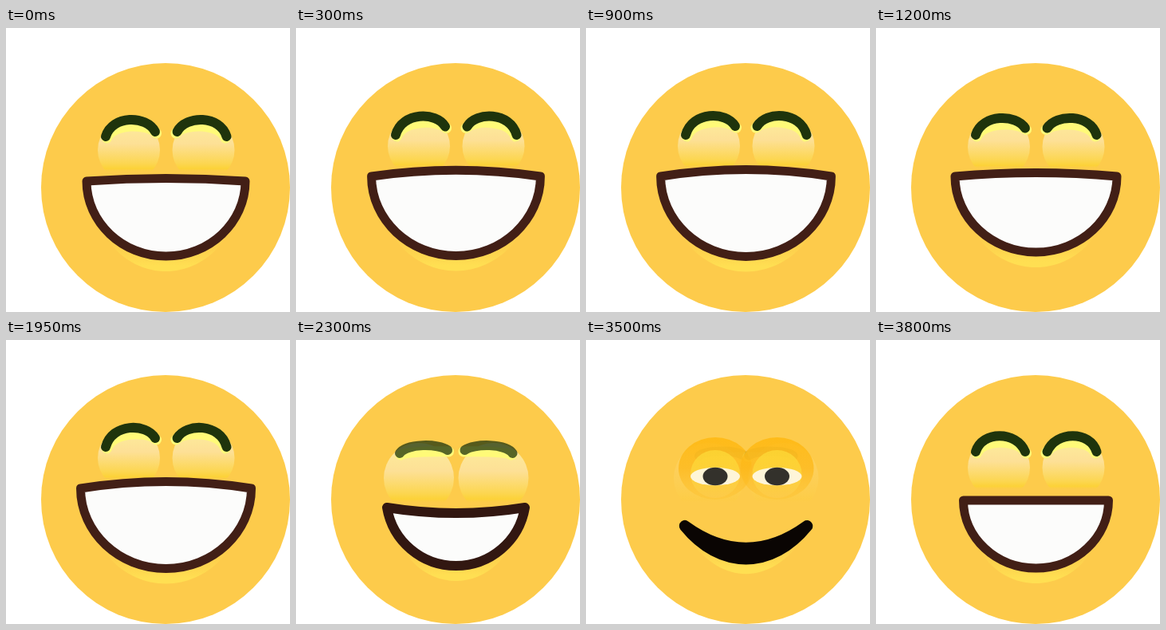
These frames come from a looping animation (356x356 px, 3850 ms). An HTML page with a canvas:

```html
<!DOCTYPE html>
<html lang="en">
<head>
<meta charset="utf-8">
<title>Laughing face</title>
<style>
  html, body { margin: 0; width: 100%; height: 100%; overflow: hidden; background: #fff; }
  canvas { display: block; }
</style>
</head>
<body>
<canvas id="stage" width="356" height="356"></canvas>
<script>
const ctx = document.getElementById('stage').getContext('2d');
const LOOP = 3850, STEP = 50, MID = 200.5;
const FACE = '#fdcb4b', CLEAR = 'rgba(253,203,75,0)';

// half width, corner y, top y, bottom y, inset, stroke | brow outer y, inner y, control y | cheek y, radius | brow alpha, eye
const opening = [91, 201, 201, 286, 0, 11, 140, 140, 113.5, 160, 39, 1, 0];
const rising = [99.5, 192, 188.5, 286, 0, 11, 136, 130, 109, 153, 39, 1, 0];
const wide = [107, 186, 177.5, 286.5, 0, 11, 134, 123, 104, 148, 39, 1, 0];
const shake = [101.5, 186, 181.5, 281, 0, 11, 134, 125.5, 107.5, 149, 39, 1, 0];
const half = [86.5, 210, 217, 283, .25, 12, 142, 138, 129.5, 173, 44, .75, 0];
const calm = [72, 240, 272, 272, 1, 15, 146, 146, 140, 173, 44, 0, 1];
const smile = [74, 239, 272, 272, 1, 15, 146, 146, 140, 173, 44, 0, 1];

const linear = u => u;
const smooth = u => u * u * (3 - 2 * u);
// time, pose, easing towards the next key
const keys = [
  [0, rising, linear], [200, wide, smooth], [550, shake, smooth], [875, wide, smooth],
  [1200, shake, smooth], [1300, wide, linear], [1550, wide, smooth], [1750, shake, smooth],
  [1950, wide, linear], [2000, wide, linear], [2300, half, linear], [2650, calm, linear],
  [2850, calm, smooth], [3050, smile, linear], [3450, smile, linear], [3700, half, linear],
  [3800, opening, linear], [LOOP, rising, linear]
];

const lerp = (a, b, u) => a + (b - a) * u;

function poseAt(t) {
  const i = keys.findIndex(k => k[0] > t);
  const [t0, from, ease] = keys[i - 1], [t1, to] = keys[i];
  const u = ease((t - t0) / (t1 - t0));
  return from.map((v, n) => lerp(v, to[n], u));
}

function vertical(y0, y1, ...stops) {
  const g = ctx.createLinearGradient(0, y0, 0, y1);
  stops.forEach(([at, color]) => g.addColorStop(at, color));
  return g;
}

function ellipse(x, y, rx, ry, fill) {
  ctx.beginPath();
  ctx.ellipse(x, y, rx, ry, 0, 0, Math.PI * 2);
  ctx.fillStyle = fill;
  ctx.fill();
}

function mouthPath(w, y, top, bottom, inset) {
  const h = bottom - y, dx = w - inset * w / 3;
  const cy = y + (.55 + .117 * inset) * h, bx = (.55 - .217 * inset) * w;
  ctx.beginPath();
  ctx.moveTo(MID - w, y);
  ctx.quadraticCurveTo(MID, 2 * top - y, MID + w, y);
  ctx.bezierCurveTo(MID + dx, cy, MID + bx, bottom, MID, bottom);
  ctx.bezierCurveTo(MID - bx, bottom, MID - dx, cy, MID - w, y);
  ctx.closePath();
}

function browStroke(x0, y0, x1, y1, cy, width, color) {
  ctx.beginPath();
  ctx.moveTo(x0, y0);
  ctx.bezierCurveTo(x0 + 8, cy, x1 - 11, cy, x1, y1);
  ctx.lineWidth = width;
  ctx.strokeStyle = color;
  ctx.stroke();
}

function drawEye(outerY, innerY, browY, cheekY, r, alpha, open) {
  const x0 = 125 + 20 * (1 - alpha), x1 = 187 + 12 * (1 - alpha);
  ctx.globalAlpha = Math.min(1, alpha * 1.33);
  ellipse(154, cheekY, r, r, vertical(cheekY - r, cheekY + r,
    [0, '#fdee9c'], [.4, '#fde096'], [.72, '#fcd650'], [.8, '#fcd238'], [.86, CLEAR]));
  browStroke(x0 + 1.5, outerY + 2, x1 + 1.5, innerY + 2, browY + 10, 13, '#fffa78');
  ctx.globalAlpha = alpha;
  browStroke(x0, outerY, x1, innerY, browY, 12, '#1f340c');

  ctx.globalAlpha = open;
  if (open > 0) {
    ellipse(162, 161, 46, 39, vertical(122, 200,
      [0, '#ffb70c'], [.5, '#fdb91c'], [.85, 'rgba(253,190,40,.6)'], [1, 'rgba(253,190,40,.35)']));
    ellipse(162, 168, 31, 30, vertical(138, 198, [0, '#fdd835'], [.4, '#fdd63a'], [1, FACE]));
    ellipse(162, 171, 31, 14 * open, '#fff');
    ellipse(162, 171, 15.5, 14 * open, '#000');
  }
  ctx.globalAlpha = 1;
}

function draw(t) {
  const [w, y, top, bottom, inset, width, ...eye] = poseAt(t);
  ctx.clearRect(0, 0, 356, 356);
  ellipse(200, 200, 156, 156, FACE);

  drawEye(...eye);
  ctx.save();
  ctx.translate(2 * 200.75, 0);
  ctx.scale(-1, 1);
  drawEye(...eye);
  ctx.restore();

  mouthPath(w * .9, y + 19, bottom, bottom + 19, inset);
  ctx.fillStyle = vertical(bottom - 35, bottom + 12, [0, CLEAR], [1, '#ffdf52']);
  ctx.fill();

  mouthPath(w, y, top, bottom, inset);
  ctx.fillStyle = '#fcfcfb';
  ctx.fill();
  ctx.lineWidth = width;
  ctx.strokeStyle = `rgb(${[66, 31, 22].map(c => Math.round(c * (1 - inset)))})`;
  ctx.stroke();
}

ctx.lineCap = ctx.lineJoin = 'round';
const start = performance.now();
function tick() {
  const t = (performance.now() - start) % LOOP;
  draw(Math.floor(t / STEP) * STEP);
  requestAnimationFrame(tick);
}
tick();
</script>
</body>
</html>
```
